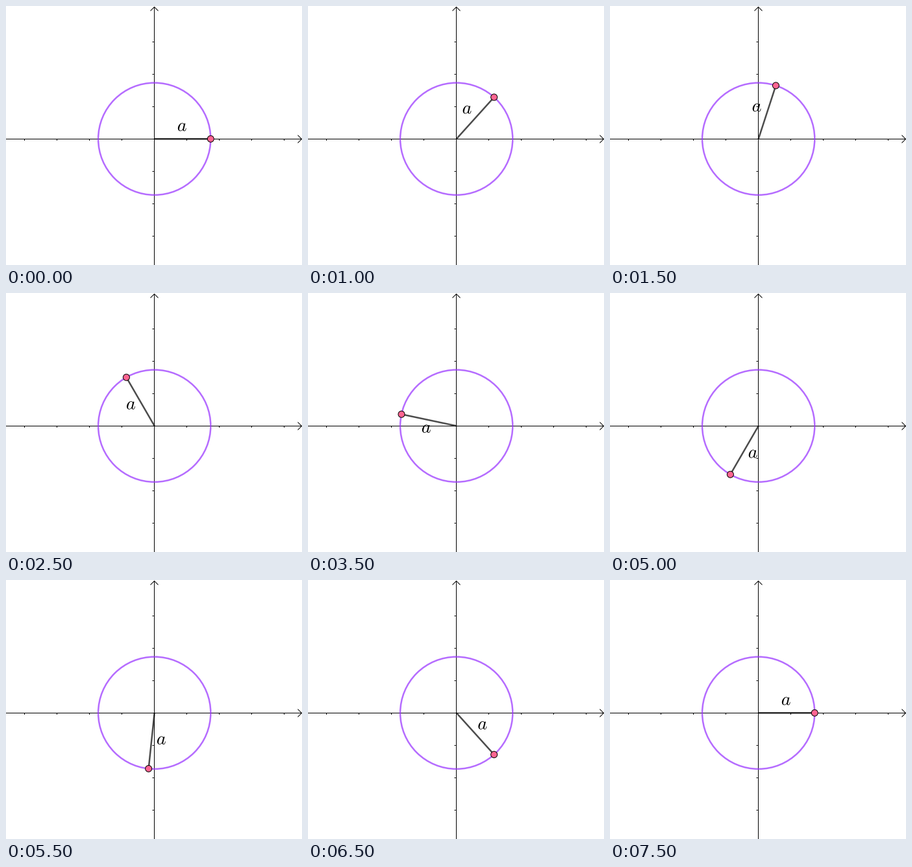
Recreate the animation shown at these times as a matplotlib script. Size 456 by 400 pixels, loop 8 s.

```python
import numpy as np
import matplotlib as mpl
import matplotlib.pyplot as plt
from matplotlib.animation import FuncAnimation
from matplotlib.patches import Circle, PathPatch
from matplotlib.path import Path
from matplotlib.textpath import TextPath

mpl.rcParams["mathtext.fontset"] = "cm"

WIDTH, HEIGHT, DPI = 456, 400, 80
PX = 72 / DPI  # one pixel in points
STEPS, INTERVAL = 16, 500
AXIS_X, AXIS_Y = 228.5, 205.5  # pixel centers keep the axes crisp
CX, CY = 228.7, 205.25
UNIT = 50
RADIUS = UNIT * np.sqrt(3)

fig = plt.figure(figsize=(WIDTH / DPI, HEIGHT / DPI), dpi=DPI, facecolor="white")
ax = fig.add_axes([0, 0, 1, 1])
ax.set_xlim(0, WIDTH)
ax.set_ylim(HEIGHT, 0)
ax.axis("off")


def line(xs, ys, width=1, **style):
    style = {"color": "black", "solid_capstyle": "butt", "snap": False, **style}
    return ax.plot(xs, ys, lw=width * PX, **style)[0]


def draw_axes():
    line([0, 455.5], [AXIS_Y, AXIS_Y], zorder=1)
    line([AXIS_X, AXIS_X], [1.5, HEIGHT], zorder=1)
    line([449.5, 455.5, 449.5], [AXIS_Y - 6, AXIS_Y, AXIS_Y + 6],
         zorder=1, solid_joinstyle="miter")
    line([AXIS_X - 6, AXIS_X, AXIS_X + 6], [7.5, 1.5, 7.5],
         zorder=1, solid_joinstyle="miter")
    for n in range(-4, 5):
        if n == 0:
            continue
        x, y = AXIS_X + n * UNIT, AXIS_Y + n * UNIT
        line([x, x], [AXIS_Y, AXIS_Y + 2.5], zorder=1)
        if abs(n) < 4:
            line([AXIS_X - 3, AXIS_X], [y, y], zorder=1)


def centered_glyph(text, size):
    glyph = TextPath((0, 0), text, size=size)
    box = glyph.get_extents()
    middle = [(box.x0 + box.x1) / 2, (box.y0 + box.y1) / 2]
    return Path((glyph.vertices - middle) * [1, -1], glyph.codes)


draw_axes()
ax.add_patch(Circle((CX, CY), RADIUS, fill=False, ec="#9933ff", alpha=0.72,
                    lw=2.5 * PX, zorder=2))
arm = line([], [], 2.5, alpha=0.7, zorder=3)
dot = ax.add_patch(Circle((CX, CY), 5, fc="#ff6592", ec="black",
                          lw=PX, zorder=5))
glyph = centered_glyph("$a$", 28)
label = ax.add_patch(PathPatch(glyph, fc="black", lw=0, zorder=4, snap=False))


def update(step):
    angle = 2 * np.pi * step / (STEPS - 1)
    dx, dy = np.cos(angle), -np.sin(angle)
    x, y = CX + RADIUS * dx, CY + RADIUS * dy
    arm.set_data([CX, x], [CY, y])
    dot.center = (x, y)
    # The label keeps to the left of the arm's midpoint.
    text_x = (CX + x) / 2 + 16 * dy - 0.7
    text_y = (CY + y) / 2 - 16 * dx - 2.3
    label.set_path(Path(glyph.vertices + [text_x, text_y], glyph.codes))
    return arm, dot, label


anim = FuncAnimation(fig, update, frames=STEPS, interval=INTERVAL,
                     repeat=True, repeat_delay=0)
plt.show()
```
